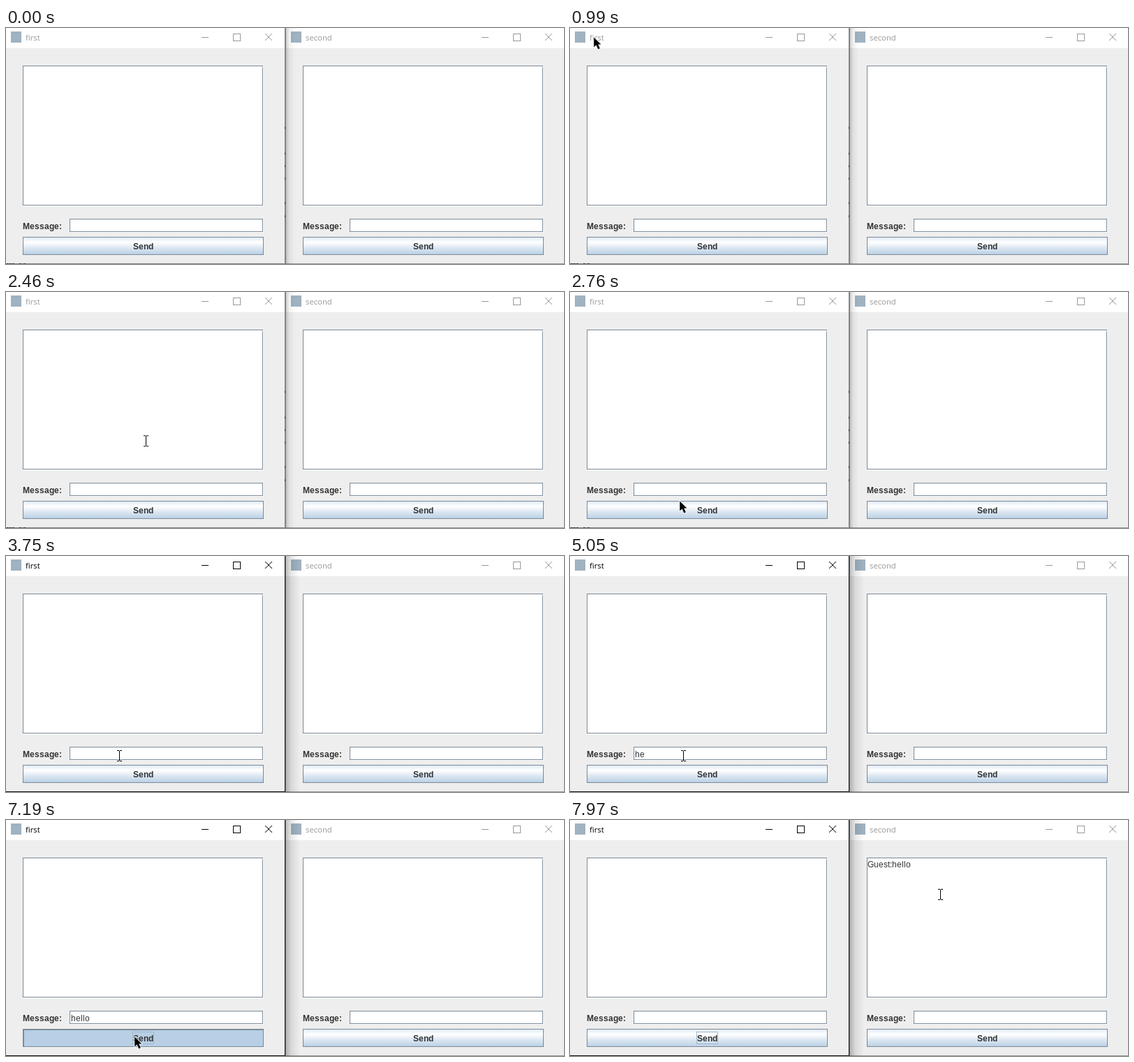
These frames come from a looping animation (799 px wide and 339 px high, 8000 ms). An HTML page with a canvas:

```html
<!DOCTYPE html>
<html lang="en">
<head>
<meta charset="utf-8">
<title>Two chat windows</title>
<style>
  html, body { margin: 0; width: 100%; height: 100%; overflow: hidden; background: #eee; }
  canvas { display: block; }
</style>
</head>
<body>
<canvas id="stage" width="799" height="339"></canvas>
<script>
const ctx = document.getElementById('stage').getContext('2d');
const LOOP = 8000;
const ACTIVATE = 3260, PRESS = 7190, RELEASE = 7400;
const EDGE = '#7a8a99', INK = '#333', PALE = '#b8cfe5', FACE = '#eee';
const FONT = '12px "Liberation Sans", Arial, sans-serif';

// Pointer moves: start, end, number of steps, first point, last point.
const MOVES = [
  [460, 460, 1, [500, 309], [500, 309]],
  [530, 680, 3, [270, 150], [28, 11]],
  [990, 1610, 9, [34, 13], [108, 37]],
  [1840, 2230, 6, [121, 38], [205, 199]],
  [2460, 2760, 5, [200, 214], [157, 300]],
  [2850, 3010, 3, [155, 306], [162, 287]],
  [6470, 6627, 3, [165, 289], [178, 301]],
  [6705, 7020, 5, [179, 303], [184, 311]],
  [7730, 7970, 4, [215, 293], [530, 107]],
];
const KEYS = [4090, 4570, 5130, 5350, 5520];
const CARET_ON = [[3260, 3750], [4090, 5050], [5130, 6070], [6570, 7020]];

function box(color, x, y, w, h) {
  ctx.fillStyle = color;
  ctx.fillRect(x, y, w, h);
}

function frame(color, x, y, w, h) {
  ctx.strokeStyle = color;
  ctx.lineWidth = 1;
  ctx.strokeRect(x + 0.5, y + 0.5, w - 1, h - 1);
}

// Every glyph advances by whole pixels; returns the end position.
function label(text, x, y, bold) {
  ctx.font = (bold ? 'bold ' : '') + FONT;
  ctx.fillStyle = INK;
  for (const ch of text) {
    ctx.fillText(ch, x, y);
    x += Math.round(ctx.measureText(ch).width);
  }
  return x;
}

function sunken(x, y, w, h) {
  box('#fff', x, y, w, h);
  frame(EDGE, x, y, w - 1, h - 1);
}

function button(state, focused) {
  const x = 24, y = 300, w = 345, h = 26;
  const shade = ctx.createLinearGradient(0, y, 0, y + h);
  shade.addColorStop(0, '#dde8f3');
  shade.addColorStop(0.3, '#fff');
  shade.addColorStop(0.6, '#dde8f3');
  shade.addColorStop(1, PALE);
  box(state === 'pressed' ? PALE : shade, x, y, w, h);
  if (state === 'hover') {
    frame(PALE, x, y, w, h);
    frame(PALE, x + 2, y + 2, w - 4, h - 4);
    frame('#6382bf', x + 1, y + 1, w - 2, h - 2);
  } else {
    frame(EDGE, x, y, w, h);
    if (state === 'pressed') {
      box(EDGE, x, y + 1, w, 1);
      box(EDGE, x + 1, y, 1, h);
    }
  }
  if (focused) frame('#a3b8cc', 181, 304, 31, 18);
  label('Send', 182, 318, true);
}

function titleBar(title, color) {
  box('#fff', 0, 0, 400, 29);
  box('#9fb3c3', 7, 5, 15, 16);
  ctx.font = '11.3px "Open Sans", "Noto Sans", sans-serif';
  ctx.fillStyle = color;
  ctx.fillText(title, 28, 18);
  box(color, 280, 13, 10, 1);
  frame(color, 325, 8, 11, 11);
  ctx.beginPath();
  ctx.moveTo(371, 8);
  ctx.lineTo(381, 18);
  ctx.moveTo(381, 8);
  ctx.lineTo(371, 18);
  ctx.stroke();
}

function chatWindow(left, { title, active, log, draft, caret, state, focused }) {
  ctx.save();
  ctx.translate(left, 0);
  box(FACE, 0, 0, 400, 339);
  titleBar(title, active ? '#000' : '#999');
  sunken(24, 54, 345, 202);
  box(FACE, 367, 56, 1, 1);
  label(log, 25, 68);
  label('Message:', 24, 289, true);
  sunken(91, 274, 278, 20);
  const end = label(draft, 93, 289);
  if (caret) box(INK, end, 276, 1, 16);
  button(state, focused);
  ctx.restore();
}

function windowEdges(active) {
  const reach = active ? 21 : 14;
  const shadow = ctx.createLinearGradient(400, 0, 400 + reach, 0);
  shadow.addColorStop(0, `rgba(0,0,0,${active ? 0.28 : 0.22})`);
  shadow.addColorStop(0.4, `rgba(0,0,0,${active ? 0.09 : 0.06})`);
  shadow.addColorStop(1, 'rgba(0,0,0,0)');
  box('#aaa', 400, 0, 1, 339);
  box('#999', 400, 338, 399, 1);
  box(shadow, 400, 0, reach, 339);
  const line = active ? '#111' : '#808080';
  box(line, 399, 0, 1, 339);
  box(line, 0, 338, 400, 1);
  if (!active) {
    for (const y of [142, 179, 197, 215, 250, 269]) box(INK, 399, y, 1, 3);
    for (const x of [1, 5, 9, 19, 25]) box(INK, x, 338, 3, 1);
  }
}

function pointerAt(t) {
  const move = MOVES.filter(m => m[0] <= t).pop();
  if (!move) return null;
  const [start, end, steps, a, b] = move;
  if (steps === 1) return a;
  const step = Math.min(steps - 1, Math.floor((t - start) / (end - start) * (steps - 1)));
  return a.map((v, i) => Math.round(v + (b[i] - v) * step / (steps - 1)));
}

const overButton = ([x, y], left) => x >= left + 24 && x < left + 369 && y > 300 && y < 326;

function overText([x, y]) {
  const u = x >= 401 ? x - 401 : x;
  return u < 369 && (u >= 24 && y >= 54 && y < 256 || u >= 91 && y >= 274 && y < 294);
}

function drawPointer([x, y]) {
  if (overText([x, y])) {
    box('#000', x, y - 7, 1, 14);
    for (const end of [y - 8, y + 7]) {
      box('#000', x - 3, end, 3, 1);
      box('#000', x + 1, end, 3, 1);
    }
    return;
  }
  const arrow = new Path2D('M0 0V14L3.4 11 6 17 8.6 15.8 6 10.2H10.2Z');
  ctx.save();
  ctx.translate(x + 0.2, y + 0.4);
  ctx.strokeStyle = '#fff';
  ctx.lineWidth = 1.4;
  ctx.stroke(arrow);
  ctx.fillStyle = '#000';
  ctx.fill(arrow);
  ctx.restore();
}

function draw(t) {
  const active = t >= ACTIVATE, sent = t >= RELEASE;
  const pointer = pointerAt(t);
  const hover = left => pointer && overButton(pointer, left) ? 'hover' : 'idle';
  const typed = KEYS.filter(k => k <= t).length;

  chatWindow(401, { title: 'second', log: sent ? 'Guest:hello' : '', draft: '', state: hover(401) });
  chatWindow(0, {
    title: 'first',
    active,
    log: '',
    draft: sent ? '' : 'hello'.slice(0, typed),
    caret: CARET_ON.some(([on, off]) => t >= on && t < off),
    state: t >= PRESS && !sent ? 'pressed' : hover(0),
    focused: t >= PRESS,
  });
  windowEdges(active);
  if (pointer) drawPointer(pointer);
}

const begin = performance.now();
function tick() {
  draw((performance.now() - begin) % LOOP);
  requestAnimationFrame(tick);
}
tick();
</script>
</body>
</html>
```
